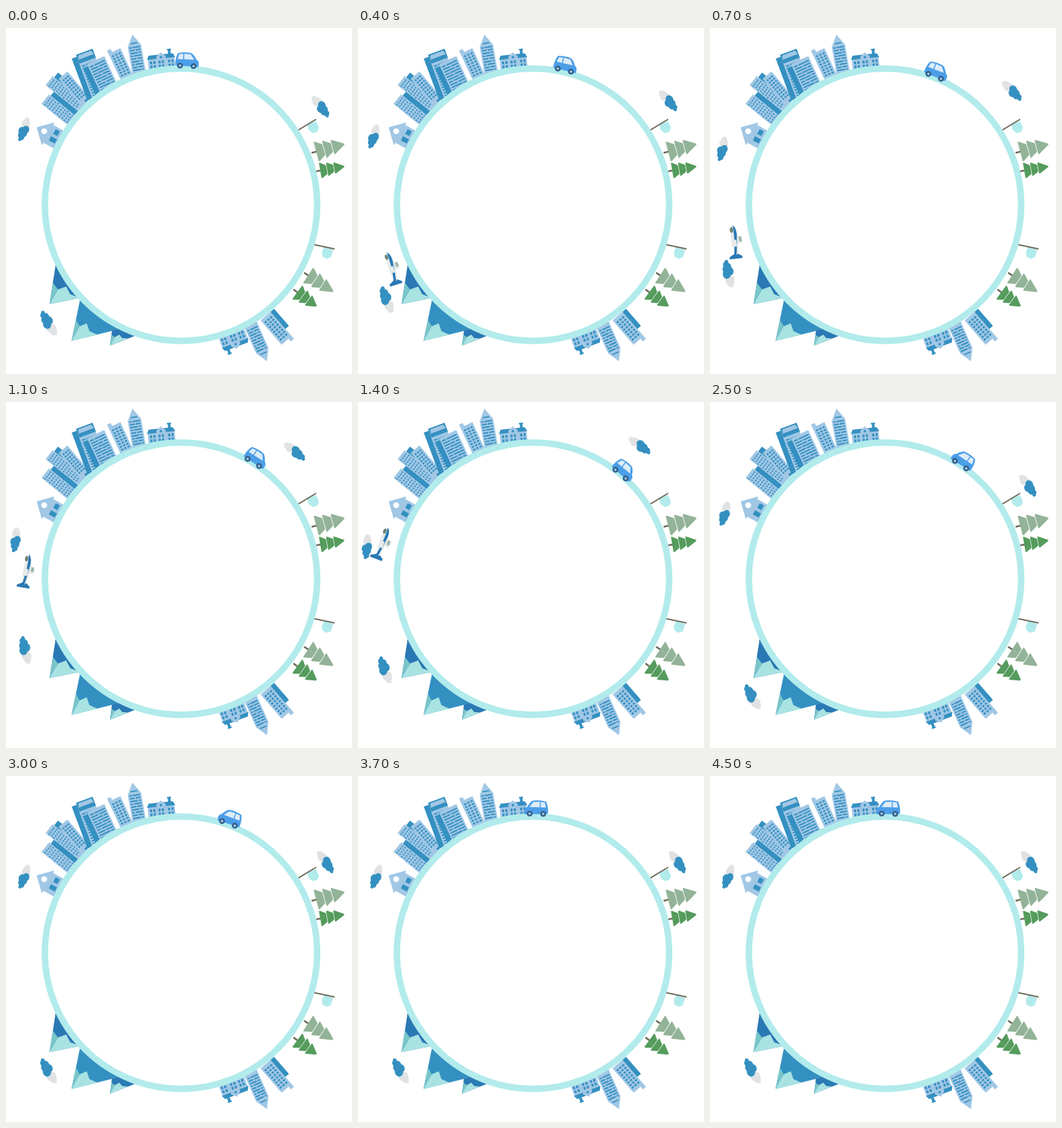
These frames come from a looping animation (512 by 512 pixels, 4.6 s). An HTML page with a canvas:

```html
<!DOCTYPE html>
<html>
<head>
<meta charset="utf-8">
<style>
html, body { margin: 0; width: 100%; height: 100%; overflow: hidden; background: #fff; }
canvas { display: block; width: 100vmin; height: 100vmin; }
</style>
</head>
<body>
<canvas id="stage" width="512" height="512"></canvas>
<script>
const c = document.getElementById('stage').getContext('2d');
const LOOP = 4600, STEP = 100, CX = 259, CY = 261.5, R = 201.5;
const DARK = '#3490c1', LIGHT = '#a1c7e5', DEEP = '#2a79b5', AQUA = '#b2ebec',
  SNOW = '#a8e3e2', SHADE = '#79c5c8', SAGE = '#93b398', GREEN = '#559c5d',
  WOOD = '#6f6c5a', GREY = '#e1e2e3', PALE = '#e6ebea', GLASS = '#dcecf8';
const rad = d => d * Math.PI / 180;
const clamp = v => Math.max(0, Math.min(1, v));
const ring = (deg, r = R) => [CX + r * Math.cos(rad(deg)), CY + r * Math.sin(rad(deg))];

function poly(color, ...p) {
  c.fillStyle = color;
  c.beginPath();
  for (let i = 0; i < p.length; i += 2) c.lineTo(p[i], p[i + 1]);
  c.closePath();
  c.fill();
}
function rect(color, x, y, w, h) {
  c.fillStyle = color;
  c.fillRect(x, y, w, h);
}
function oval(color, x, y, rx, ry = rx) {
  c.fillStyle = color;
  c.beginPath();
  c.ellipse(x, y, rx, ry, 0, 0, 7);
  c.fill();
}
function line(color, w, x1, y1, x2, y2) {
  c.strokeStyle = color;
  c.lineWidth = w;
  c.beginPath();
  c.moveTo(x1, y1);
  c.lineTo(x2, y2);
  c.stroke();
}
function at(x, y, deg, draw, sx = 1, sy = sx) {
  c.save();
  c.translate(x, y);
  c.rotate(rad(deg));
  c.scale(sx, sy);
  draw();
  c.restore();
}
function orbit(deg, r, turn, draw, sx, sy) {
  at(...ring(deg, r), deg + turn, draw, sx, sy);
}

// Facade patterns; each building stands on its local origin.
function windows(x, y, cols, rows, dx, dy, w, h) {
  for (let r = 0; r < rows; r++)
    for (let k = 0; k < cols; k++) rect(DARK, x + k * dx, y + r * dy, w, h);
}
function stripes(w, h) {
  for (let y = 5 - h, r = 0; y < -2; y += 4.2, r++) {
    const cut = w * (0.3 + 0.2 * (r * 7 % 3));
    rect(DARK, 2 - w / 2, y, cut - 2.5, 2);
    rect(DARK, cut - w / 2 + 1, y, w - cut - 3, 2);
  }
}
function dots(w, h) {
  for (let y = 5 - h, r = 0; y < -1; y += 4.6, r++)
    for (let k = 0; k < 4; k++)
      oval(DARK, (k - 1.5) * (w - 6) / 3 + (r % 2 - 0.5), y, 1.2);
}
function grid(w, h) {
  windows(3 - w / 2, 5 - h, 3, Math.floor(h / 4.5) - 1, (w - 4) / 3, 4.5, w / 6, 2.5);
}
function block(x, y, deg, w, h, side, pattern) {
  at(x, y, deg, () => {
    rect(DARK, side < 0 ? side - w / 2 : w / 2, 3 - h, Math.abs(side), h);
    rect(LIGHT, -w / 2, -h, w, h + 3);
    pattern(w, h);
  });
}
function roofed(w, h) {
  rect(DARK, -w / 2, -h, w, 14);
  poly(LIGHT, -w / 2 + 1, 8 - h, -w / 2 + 3, 2 - h, w / 2 - 3, 2 - h, w / 2 - 1, 8 - h);
  c.translate(0, 1);
  stripes(w, h - 12);
}
function spire() {
  poly(LIGHT, -10, 3, -10, -40, 0, -57, 10, -40, 10, 3);
  stripes(20, 44);
  rect(DARK, -5, -45, 10, 1.8);
}
function slab() {
  rect(LIGHT, -10, -41, 19.5, 44);
  rect(LIGHT, -10, -46, 6, 6);
  grid(20, 41);
}
function townHouse() {
  rect(LIGHT, -20, -15, 40, 18);
  poly(DARK, -21, -14, -18, -20, 18, -20, 21, -14);
  rect(DARK, 11, -26, 4, 8);
  rect(DARK, 10, -27, 6, 2);
  poly(LIGHT, -7, 2, -7, -17, 0, -23, 7, -17, 7, 2);
  oval(DARK, 0, -16, 1.8);
  for (const x of [-17, -4.5, 10]) windows(x, -11, 2, 2, 5, 6, 3, 4);
}
function cottage() {
  poly(LIGHT, -19, -20, 0, -39, 19, -20, 15, -19, 15, 2, -15, 2, -15, -19);
  oval('#fff', 0.5, -26.5, 4.3);
  rect(DARK, 3.5, -13, 8, 7);
  rect(DARK, -8, -14, 7, 10);
}
function city() {
  block(98.5, 138, -51, 18, 52, 8, dots);
  block(111, 115, -52, 17, 60, 9, dots);
  block(114, 105, -40, 17, 46, 0, grid);
  block(139, 97, -20.5, 26, 66, -8, roofed);
  block(153, 91, -25, 28, 48, -8, stripes);
  at(79.5, 166, -61, cottage);
  at(178, 71, -25, slab);
  at(197, 66, -10, spire);
  at(231, 59, -6, townHouse);
  at(334, 453, 159, townHouse);
  at(363, 441, 156, spire);
  at(386, 429, 139, () => {
    rect(DARK, -17, -28, 8, 31);
    slab();
  }, 1, 1.08);
}

// A mountain standing on the ring from angle a to b, with a jagged snow cap.
function peak(a, b, x, y, color, spread) {
  const A = ring(a), B = ring(b), M = ring((a + b) / 2);
  const p = (u, v) => [0, 1].map(i => [x, y][i] * (1 - u - v * spread) + A[i] * u + B[i] * v * spread);
  poly(color, x, y, ...A, ...M, ...B);
  poly(SHADE, x, y, ...p(0.48, 0), ...p(0.3, 0.2));
  poly(SNOW, x, y, ...p(0.3, 0.2), ...p(0.33, 0.45), ...p(0.13, 0.62), ...p(0, 0.95));
}
function tree(x, y, deg, len, half, color) {
  at(x, y, deg, () => {
    line(WOOD, 2.6, -7, 0, 3, 0);
    c.lineJoin = 'round';
    for (let i = 0; i < 3; i++) {
      const a = i * 0.29 * len + 1, b = i < 2 ? a + 0.27 * len - 2 : len - 1;
      const wa = half * (1 - 0.14 * i) - 1, wb = half * [0.52, 0.4, 0.03][i];
      poly(color, a, -wa, b, -wb, b, wb, a, wa);
      c.strokeStyle = color;
      c.lineWidth = 2;
      c.stroke();
    }
  });
}
function flag(deg, lean) {
  orbit(deg, 205, lean, () => {
    poly(AQUA, 17, 0, 32, 2, 31, 14, 25, 18, 18, 16, 15, 9);
    line(WOOD, 2, -1, 0, 34, 0);
  }, 0.93);
}
function scenery() {
  peak(156.2, 137, 64.5, 408.5, DEEP, 1);
  peak(120, 108, 154, 470, DEEP, 0.65);
  peak(137.5, 115, 97, 463, DARK, 0.52);
  city();
  tree(459, 183, -15, 43, 15, SAGE);
  tree(465, 211, -10, 36, 11.5, GREEN);
  tree(447, 366, 33, 44, 13.5, SAGE);
  tree(431, 391, 36, 35, 12.5, GREEN);
  flag(-32.5, 1.5);
  flag(16.7, -4.7);
  c.strokeStyle = AQUA;
  c.lineWidth = 9.4;
  c.beginPath();
  c.arc(CX, CY, R, 0, 7);
  c.stroke();
}

// A row of lumps along the x axis, tapering towards the end.
function puff(color, x, len, half) {
  for (let i = 0; i < 6; i++) {
    const k = i / 5, r = half * (0.72 - 0.38 * k * k);
    oval(color, x + len * k, (i % 2 ? 1 : -1) * half * 0.36 * (1 - k * 0.7), r * 1.15, r);
  }
}
function cloud() {
  puff(GREY, -6, -10, 6.2);
  puff(DARK, 0, 16, 7.2);
}
function car() {
  c.fillStyle = '#4c9ee8';
  c.beginPath();
  c.moveTo(-17, -4);
  c.quadraticCurveTo(-18, -14, -14, -23);
  c.quadraticCurveTo(-4, -26, 6, -24);
  c.quadraticCurveTo(10, -22, 14, -14);
  c.quadraticCurveTo(19, -12, 17, -3);
  c.fill();
  poly(GLASS, -14, -14, -12, -21.5, -6, -22.5, -6, -14);
  poly(GLASS, -4.5, -14, -4.5, -22.6, 5, -22, 10.5, -14);
  for (const x of [-10, 10]) {
    oval('#315d87', x, -4, 4.4);
    oval(LIGHT, x, -4, 1.9);
  }
}
function plane() {
  poly(PALE, 2, -14, 12, -2, 11, 4, 2, 2);
  rect('#9db5a6', 7, -7, 4, 7);
  poly(DEEP, -1, 17, -10, 22, -10, 25, 9, 25, 9, 22, 2, 17);
  oval(PALE, 0.5, -2, 4.8, 22);
  c.fillStyle = DEEP;
  c.beginPath();
  c.moveTo(0, -25);
  c.quadraticCurveTo(7, -19, 4, -4);
  c.quadraticCurveTo(3, 8, 0, 24);
  c.lineTo(-3, 22);
  c.quadraticCurveTo(2, -6, 0, -25);
  c.fill();
  oval('#6d8274', -2.4, -18, 2.3, 4);
  rect(PALE, -2, -3, 5, 10);
}

const ease = (t, a, b) => (1 - Math.cos(Math.PI * clamp((t - a) / (b - a)))) / 2;
// Swing from a to the peak at time m, then on to b at time e.
const swing = (t, a, m, top, e, b) => t < m
  ? a + (top - a) * ease(t, 0, m)
  : top + (b - top) * ease(t, m, e);

function draw(ms) {
  const t = ms / 1000;
  rect('#fff', 0, 0, 512, 512);
  scenery();

  const left = swing(t, 25.7, 1.5, 10.8, 3, 25.9);
  const right = swing(t, 35.2, 1.6, 52, 2.65, 32.2);
  const low = swing(t, 41.9, 0.85, 22.4, 1.98, 41.8);
  orbit(180 + left, 245 + left / 2, -96, cloud);
  orbit(-right, 252.5, 87, cloud, 1.04);
  orbit(180 - low, 240 + low * 0.55, 101, cloud, 1.12);

  const size = clamp((t - 0.05) / 0.3) * clamp((1.86 - t) / 0.37);
  if (size > 0) orbit(150 + 49 * ease(t, 0, 1.8), 229.5, -173, plane, size);

  const back = t > 1.84;
  const lean = back ? Math.max(1.4, 51.2 - 26.8 * (t - 1.84)) : 2.4 + 26.8 * t;
  orbit(lean - 90, 202 - lean / 10, 90, car, back ? -1 : 1, 0.96);
}

const start = performance.now();
function tick() {
  const ms = (performance.now() - start) % LOOP;
  draw(Math.floor(ms / STEP) * STEP);
  requestAnimationFrame(tick);
}
tick();
</script>
</body>
</html>
```
